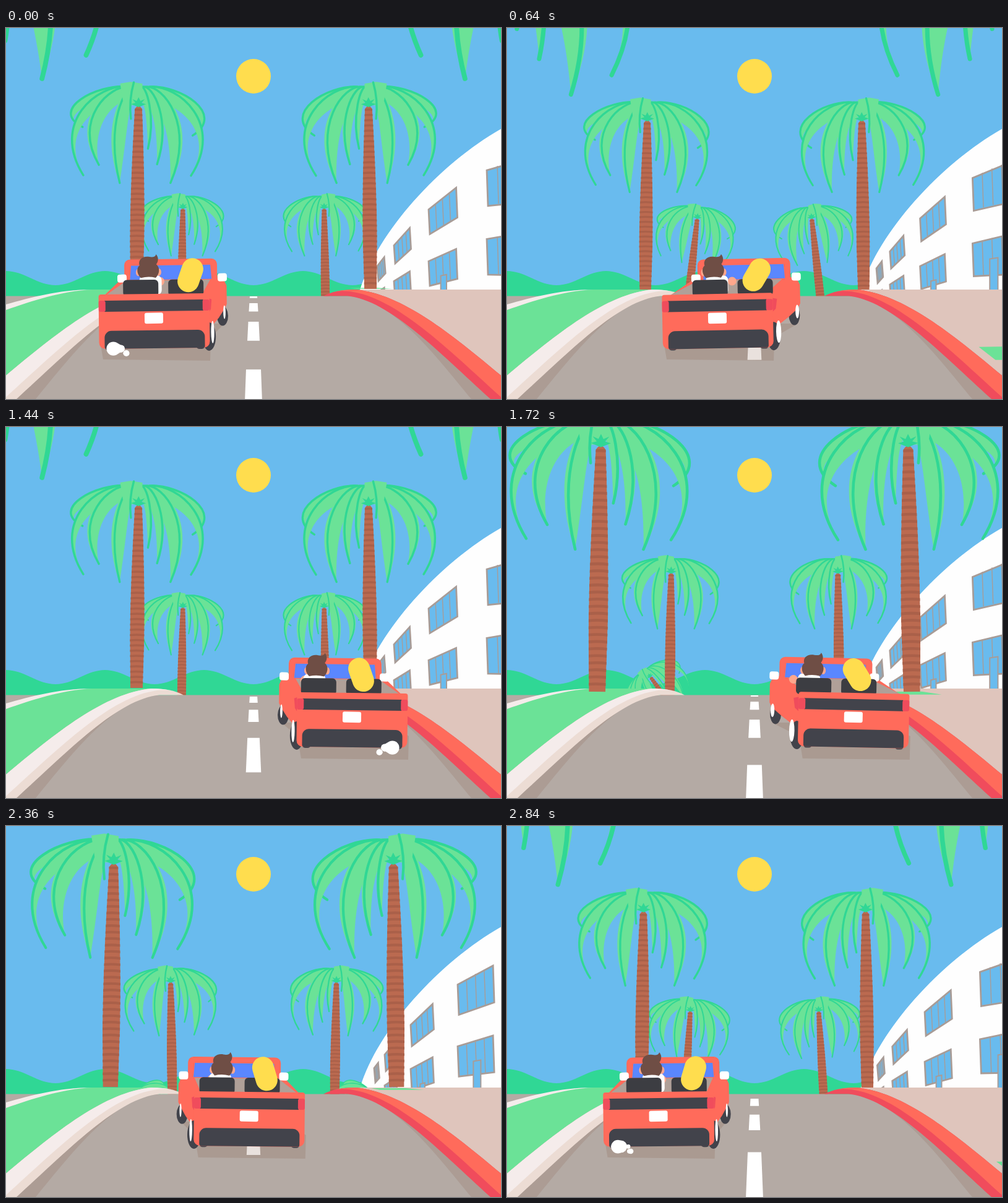
These frames come from a looping animation (800 by 600 pixels, 2880 ms). An HTML page with a canvas:

```html
<!DOCTYPE html>
<html lang="en">
<head>
<meta charset="utf-8">
<title>Palm drive</title>
<style>
html, body { margin: 0; width: 100%; height: 100%; overflow: hidden; }
canvas { display: block; width: 800px; height: 600px; }
</style>
</head>
<body>
<canvas id="stage" width="800" height="600"></canvas>
<script>
const ctx = document.getElementById('stage').getContext('2d');
const { sin, cos, exp, max, min, abs, sign, PI } = Math;
const LOOP = 2880, STEP = 40, PALM_GAP = 720, WINDOW_GAP = 360, DASH_GAP = 192;
const SKY = '#69bbee', LEAF = '#6be297', RIB = '#30d795', ROAD = '#b4aaa4', SHADE = '#ac9c94',
  RED = '#ff6b5b', CRIMSON = '#f04c5c', DARK = '#42434b', YELLOW = '#ffdd4e', SKIN = '#ffa78c',
  FRAME = '#a89c97', HAIR = '#6f4e45', PALE = '#f5eceb', SAND = '#ecdcd4', WHITE = '#fff';

// ---- helpers ----
const asPath = d => typeof d === 'string' ? new Path2D(d) : d;
function fill(color, d) {
  ctx.fillStyle = color;
  ctx.fill(asPath(d));
}
function stroke(color, width, d) {
  ctx.strokeStyle = color;
  ctx.lineWidth = width;
  ctx.stroke(asPath(d));
}
function poly(...points) {
  const p = new Path2D();
  points.forEach(([x, y]) => p.lineTo(x, y));
  p.closePath();
  return p;
}
function oval(color, x, y, rx, ry = rx) {
  const p = new Path2D();
  p.ellipse(x, y, rx, ry, 0, 0, 7);
  fill(color, p);
}
function box(color, x0, y0, x1, y1, r = 0) {
  const p = new Path2D();
  p.roundRect(x0, y0, x1 - x0, y1 - y0, r);
  fill(color, p);
}
function placed(x, y, angle, draw) {
  ctx.save();
  ctx.translate(x, y);
  ctx.rotate(angle);
  draw();
  ctx.restore();
}
function mirrored(draw) {
  ctx.save();
  ctx.translate(800, 0);
  ctx.scale(-1, 1);
  draw();
  ctx.restore();
}

// ---- palms ----
const TRUNK = 297;
// tip x, tip y and fullness of each frond, back to front
const FRONDS = [
  [-90, 36, 4], [88, 48, 4], [-88, 114, 5], [86, 113, 5], [-63, 97, 15],
  [53, 125, 19], [31, 95, 11], [16, 70, 7], [-29, 126, 19]
];
const trunkShape = new Path2D(`M-6 6Q0 -4 6 6C9 70 12 150 11.5 220L10 ${TRUNK}H-10L-11.5 220C-12 150 -9 70 -6 6Z`);
const rings = new Path2D();
for (let y = 8; y < TRUNK; y += 8.5) {
  rings.moveTo(-14, y);
  rings.quadraticCurveTo(0, y - 2, 14, y);
}

function frond([x, y, w]) {
  const bend = offset => 1.6 * x + sign(x) * offset * w;
  const low = y * .25;
  fill(LEAF, `M${x * .1} -31C${x * .75} -38 ${bend(1)} ${low} ${x} ${y}C${bend(-1.6)} ${low + 6} ${x * .6} -16 0 -8Z`);
  stroke(RIB, 3.4, `M${x * .2} -30C${x * .75} -34 ${bend(.4)} ${low} ${x} ${y}`);
}
function crown() {
  ctx.lineCap = 'round';
  FRONDS.forEach(frond);
  fill(LEAF, 'M-30 -35L-13 -38L6 -35L6 0H-24Z');
  stroke(RIB, 3.4, 'M-8 -37Q-16 -8 -12 22');
}
function palmAt(age) {
  const v = (age - 1440) / 1000;
  const k = exp(v * (.9 + .5 * v + .25 * v * v));
  const top = 125 - v * (300 + 140 * v + 60 * v * v);
  const spring = sin(min((430 - age) / 290 * PI, PI / 2)) * exp((280 - age) * .0045);
  return { k, x: 400 - 189 * k, y: top + TRUNK * k, tilt: .014 - .63 * spring, exit: max(0, v - .44) };
}
function palm({ k, x, y, tilt, exit }) {
  placed(x, y, tilt, () => {
    ctx.scale(k, k);
    ctx.translate(0, -TRUNK);
    placed(0, 0, -.55 * exit, () => {
      ctx.scale(1 - .55 * exit, 1 - .55 * exit);
      crown();
    });
    ctx.clip(trunkShape);
    fill('#bb6a50', trunkShape);
    stroke('#aa6049', 3.4, rings);
  });
  placed(x, y, tilt, () => {
    ctx.scale(k, k);
    ctx.translate(0, -TRUNK);
    fill(RIB, 'M0 3L-12 -2L-5 -4L-10 -10L-3 -7L0 -13L3 -7L10 -10L5 -4L12 -2Z');
  });
}
function grassPatch({ k }) {
  const x = 400 + 189 * k, y = 421 + 62 * (k - 1) ** 1.8;
  const w = k / 1.64, h = min(1.5, max(.1, (y - 419) / 33));
  fill(LEAF, poly([x - 55 * w, y - 6 * h], [x + 19 * w, y - 7 * h], [x + 59 * w, y + 8 * h], [x - 36 * w, y + 8 * h]));
}
function palms(t, near) {
  for (let age = t % PALM_GAP; age < 2420; age += PALM_GAP) {
    if (age < 160 || (age >= 1440) !== near) continue;
    const p = palmAt(age);
    if (near) grassPatch(p);
    palm(p);
    mirrored(() => palm(p));
  }
}

// ---- scenery ----
function backdrop() {
  ctx.fillStyle = SKY;
  ctx.fillRect(0, 0, 800, 600);
  oval(YELLOW, 400, 78, 28);
  const hills = new Path2D('M0 434');
  for (let x = 0; x <= 600; x += 5) hills.lineTo(x, 404.5 - 11.5 * cos(x * PI / 80));
  hills.lineTo(600, 434);
  fill(RIB, hills);
}

const windowX = n => 600 + 27 * n + 14.5 * n * (n - 1) + 1.5 * n * (n - 1) * (n - 2);
function windowTop(x, lower) {
  const d = x - 600;
  return lower ? 428 - .72 * d + .0013 * d * d : 385 - 1.3 * d + .0024 * d * d;
}
const windowBottom = (x, lower) => windowTop(x, lower) + 24 + .19 * (x - 600);

function pane(n, lower) {
  const left = windowX(n), right = windowX(n + .53);
  const shape = poly([left, windowTop(left, lower)], [right, windowTop(right, lower)],
    [right + 2, windowBottom(right, lower)], [left + 2, windowBottom(left, lower)]);
  fill(SKY, shape);
  for (const u of [.25, .5, .75]) {
    const x = left + (right - left) * u;
    stroke(FRAME, 1.4, `M${x} ${windowTop(x, lower)}L${x + 2} ${windowBottom(x, lower)}`);
  }
  stroke(FRAME, 2.8, shape);
}
function door(n) {
  const left = windowX(n + .25), right = windowX(n + .36), top = windowTop(left, true) + 33;
  const shape = poly([left, top], [right, top - 2], [right, 430], [left, 430]);
  fill(SKY, shape);
  stroke(FRAME, 2, shape);
}
function building(t) {
  const wall = new Path2D('M800 163C700 220 600 330 572 423V426H800Z');
  ctx.save();
  ctx.clip(wall);
  fill('#fefefe', wall);
  for (let i = -1; i < 4; i++) {
    const n = i + t % WINDOW_GAP / WINDOW_GAP;
    pane(n, false);
    pane(n, true);
    door(n);
  }
  ctx.restore();
}

// Right-hand kerb; the left one is its mirror image.
function kerb(outer, inner) {
  fill(SHADE, 'M550 433.5C625 438 690 525 752 600H790L620 440Z');
  fill(inner, 'M513 433.5Q532 423 565 423C640 430 720 495 800 562V600H783C700 525 620 440 552 433.5Z');
  fill(outer, 'M528 427Q545 423 565 423C640 430 720 495 800 562V597C710 515 630 436 556 426Q540 424 528 427Z');
}
function ground() {
  fill(ROAD, 'M0 433.5H800V600H0Z');
  fill(LEAF, 'M0 456C40 442 90 424 140 423H235C160 430 80 495 0 562Z');
  fill(PALE, 'M0 447C40 436 85 423 140 423C90 425 40 442 0 456Z');
  fill('#dfc5bc', 'M565 423H800V562C720 495 640 430 565 423Z');
  mirrored(() => kerb(PALE, SAND));
  kerb(RED, CRIMSON);
}
function dashes(t) {
  const half = y => 6 * ((y - 380) / 54) ** .6;
  const yAt = depth => depth > .0035 ? max(434, 377 + 1 / depth) : 660;
  for (let i = -2; i < 5; i++) {
    const depth = .00571 + .0045 * (i - t / DASH_GAP % 1);
    const y0 = yAt(depth), y1 = yAt(depth - .00245);
    if (y1 > y0) fill(WHITE, poly([400 - half(y0), y0], [400 + half(y0), y0], [400 + half(y1), y1], [400 - half(y1), y1]));
  }
}

// ---- car ----
const turn = t => 2 * PI * t / LOOP;
function carX(t) {
  const a = turn(t);
  return 408 - 160 * cos(a) - 48 * sin(a) - 9 * cos(2 * a) - 4 * sin(2 * a);
}
function carSide(shift) {
  const side = sign(shift), turned = abs(shift) / 45, edge = side * 88, front = shift + side * 90;
  oval(DARK, edge + shift * .82, 467, 9, 16);
  fill(RED, poly([side * 80, 431], [shift + side * 70, 404], [front - side * 5, 407], [front, 418], [front, 448],
    [front - side * 4, 456], [edge + shift * .6, 470], [edge + shift * .3, 480], [edge, 512]));
  fill(CRIMSON, poly([edge, 438], [edge + shift * .2, 440], [edge + shift * .15, 456], [edge, 462]));
  oval(WHITE, edge + shift * .93, 461, 3 * turned, 11);
  oval(DARK, side * 86 + shift * .1, 500, 11, 23);
  oval(WHITE, edge + shift * .24, 493, 4.2 * turned, 18);
}
function man(x, lean) {
  oval(SKIN, x + lean * 33, 410, 7);
  box(WHITE, x - 18 + lean * 6, 400, x + 18 + lean * 6, 432, 8);
  oval(SKIN, x - 16, 395, 4, 6);
  oval(SKIN, x + 17, 395, 4, 6);
  placed(x, 0, 0, () => fill(HAIR,
    'M-12 404C-20 396 -18 386 -14 384C-17 374 -8 368 2 370C8 371 12 370 13 366C18 372 16 379 13 382C20 388 18 398 12 404Q0 401 -12 404Z'));
}
function carBody(yaw, swing) {
  const shift = 49 * yaw, cabin = shift * .6;
  fill(RED, poly([-89, 440], [shift - 76, 402], [shift + 76, 402], [89, 440]));
  fill('#b0a098', poly([-78, 432], [shift - 66, 404], [shift + 66, 404], [78, 432]));
  box(RED, shift - 75, 374, shift + 75, 408, [9, 9, 0, 0]);
  fill('#5a87ff', poly([shift - 64, 384], [shift + 64, 384], [shift + 66, 407], [shift - 66, 407]));
  if (abs(shift) > 3) carSide(shift);
  for (const x of [-80, 82]) box(WHITE, shift * 1.06 + x - 8, 398, shift * 1.06 + x + 7, 411, 4);

  man(cabin - 41 + 8 * swing, yaw);
  for (const x of [-66, 7]) box('#3c3d42', cabin + x, 407, cabin + x + 57, 434, 6);
  placed(cabin + 31 + 6 * swing, 400.5, .6 * yaw, () => box(YELLOW, -17.5, -28, 17.5, 28, 17.5));

  for (const x of [-80, 68]) box(DARK, x, 505, x + 14, 520, 5);
  box(RED, -89, 430, 90, 518, [4, 4, 10, 10]);
  box(DARK, -80, 440, 80, 458);
  box(CRIMSON, -89, 440, -78, 458, 3);
  box(CRIMSON, 79, 440, 90, 458, 3);
  box(WHITE, -15, 460.5, 15, 478, 3);
  box(DARK, -80, 489, 82, 518, [11, 11, 3, 3]);
}
function car(t) {
  const yaw = sin(turn(t - 2600)), shift = 49 * yaw;
  placed(carX(t), 0, 0, () => {
    fill('rgba(120,70,45,.16)', poly([-88, 500], [shift - 86, 478], [shift + 86, 478], [92, 500], [91, 538], [-82, 536]));
    placed(0, 470, -.022 * yaw, () => {
      ctx.translate(0, -470);
      carBody(yaw, 1 + cos(turn(t)));
    });
  });
}
// One burst per swerve, from the exhaust on the outer side.
function smoke(t) {
  const age = (t + 380) % 1440, side = t > 1000 && t < 2300 ? -1 : 1;
  for (let i = 0; i < 9; i++) {
    const life = (age - 40 * i) / 330;
    if (life <= 0 || life >= 1) continue;
    const r = (8 + 4 * sin(i * 1.7)) * sin(PI * life);
    oval(WHITE, carX(t) + side * (14 * sin(i * 2.4) - 58), 521 + 5 * cos(i * 2.1), r);
  }
}

function draw(now) {
  const t = Math.floor(now / STEP) * STEP % LOOP;
  backdrop();
  building(t);
  palms(t, false);
  ground();
  dashes(t);
  palms(t, true);
  car(t);
  smoke(t);
}
const start = performance.now();
function tick() {
  draw(performance.now() - start);
  requestAnimationFrame(tick);
}
tick();
</script>
</body>
</html>
```
